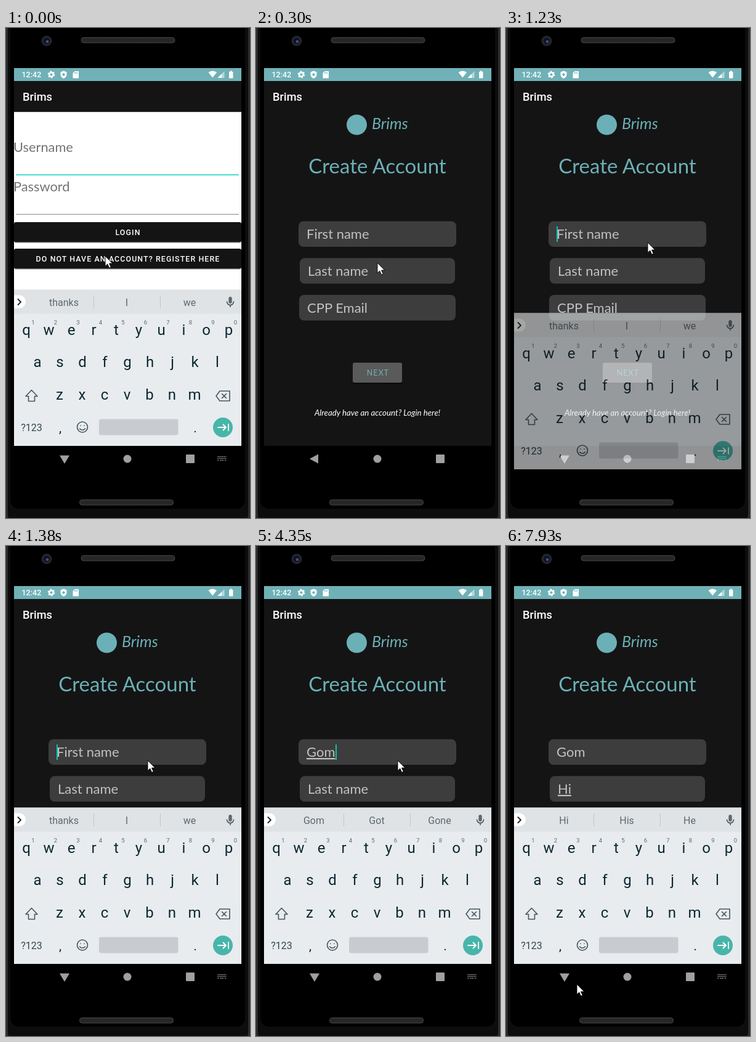
These frames come from a looping animation (396 by 795 pixels, 8000 ms). An HTML page:

```html
<!DOCTYPE html>
<html lang="en">
<head>
<meta charset="utf-8">
<title>Create account demo</title>
<style>
html, body { margin: 0; width: 100%; height: 100%; overflow: hidden; background: #000; }
svg { display: block; width: 100vw; height: 100vh; }
text { font-family: Lato, sans-serif; }
.roboto text, text.roboto { font-family: Roboto, sans-serif; }
.mid { text-anchor: middle; }
.caps { font-size: 12.4px; letter-spacing: 1.1px; text-anchor: middle; }
.line { fill: none; stroke-linecap: round; stroke-linejoin: round; }
</style>
</head>
<body>
<svg viewBox="0 0 396 795">
  <defs>
    <pattern id="mesh" width="3" height="3" patternUnits="userSpaceOnUse">
      <rect width="3" height="3" fill="#1c1c1c"/>
      <path d="M0 3L3 0" stroke="#3c3c3c"/>
    </pattern>
    <clipPath id="screen"><rect x="13" y="65" width="369" height="651"/></clipPath>
  </defs>

  <!-- phone body -->
  <rect width="396" height="795" fill="#24262b"/>
  <rect x="2" y="-40" width="392" height="860" rx="34" fill="#0d0d0d" stroke="#343434" stroke-width="1.5"/>
  <rect x="7" y="-40" width="381" height="820" rx="14" fill="#000"/>
  <circle cx="66" cy="21" r="8.5" fill="#25252a"/>
  <circle cx="66" cy="21" r="5" fill="#10131f"/>
  <circle cx="67" cy="22" r="2.3" fill="#3b4fa0"/>
  <g fill="url(#mesh)" stroke="#474747">
    <rect x="122" y="15.5" width="152" height="8.5" rx="4"/>
    <rect x="119.500" y="765.500" width="152" height="8.500" rx="4"/>
  </g>

  <g clip-path="url(#screen)">
    <rect x="13" y="86" width="369" height="592" fill="#141414"/>

    <g id="loginPage">
      <rect x="13" y="136" width="369" height="542" fill="#fff"/>
      <path d="M13 136.500H382" stroke="#ccc"/>
      <g font-size="21.8" fill="#757575">
        <text x="12" y="201">Username</text>
        <text x="12" y="265">Password</text>
      </g>
      <path d="M16 238.300H378" stroke="#10cfc3" stroke-width="1.6"/>
      <path d="M16 302.300H378" stroke="#808080"/>
      <g fill="#bbb">
        <rect x="13" y="316" width="369" height="33" rx="3"/>
        <rect x="13" y="359" width="369" height="33" rx="3"/>
      </g>
      <rect x="13" y="315" width="369" height="32.500" rx="3" fill="#141414"/>
      <rect id="register" x="13" y="358" width="369" height="32.500" rx="3"/>
      <g class="roboto" fill="#fff" font-weight="500">
        <text class="caps" x="198" y="336">LOGIN</text>
        <text class="caps" x="198" y="379">DO NOT HAVE AN ACCOUNT? REGISTER HERE</text>
      </g>
    </g>

    <g id="signupPage">
      <circle cx="163.500" cy="157" r="16.500" fill="#6cb0b7"/>
      <text x="188" y="164" font-size="25" font-style="italic" fill="#6cb0b7">Brims</text>
      <text class="mid" x="197" y="236" font-size="33" fill="#6cb0b7">Create Account</text>
      <g id="fields" font-size="22"></g>
      <rect x="157" y="544.500" width="80" height="33" rx="3" fill="#060606"/>
      <rect x="157" y="543" width="80" height="32.500" rx="3" fill="#5a5a5a"/>
      <text class="caps" x="198" y="564" fill="#6cb0b7">NEXT</text>
      <text class="mid" x="197" y="629" font-size="13.3" font-style="italic" fill="#fff">Already have an account? Login here!</text>
    </g>

    <!-- status bar and toolbar -->
    <rect x="13" y="65" width="369" height="21" fill="#6fb1b7"/>
    <g fill="#fff" class="roboto" font-weight="500">
      <text x="25.500" y="80" font-size="12.5">12:42</text>
      <text x="27" y="118" font-size="18.300">Brims</text>
    </g>
    <g fill="#fff">
      <circle cx="73.500" cy="75.500" r="3.300" fill="none" stroke="#fff" stroke-width="2.400"/>
      <circle cx="73.500" cy="75.500" r="5" fill="none" stroke="#fff" stroke-width="1.800" stroke-dasharray="2.600 2.636"/>
      <path d="M93.500 69.500l5 2v4q0 4-5 6.500q-5-2.500-5-6.500v-4z"/>
      <path d="M93.500 73l2.600 2.600-2.600 2.600-2.600-2.600z" fill="#6fb1b7"/>
      <path d="M111.500 70h6.500v11.500h-9.500v-8.500z"/>
      <path d="M111.500 71.500v2.500m2-2.500v2.500m2-2.500v2.500" stroke="#6fb1b7"/>
      <path d="M328.500 72q6.800-5 13.600 0l-6.800 8.500z"/>
      <path d="M354.500 70v11h-11z" opacity=".5"/>
      <path d="M350 74.500v6.500h-6.500z"/>
      <path d="M362 71h1.700v-1.500h3v1.500h1.700v10.500h-6.400z"/>
    </g>

    <!-- navigation bar -->
    <rect x="13" y="678" width="369" height="38" fill="#000"/>
    <g fill="#a0a0a0">
      <path id="back" d="M101 691.500v15l-14-7.500z"/>
      <path id="hide" d="M87 693.500h16l-8 13.500z"/>
      <circle cx="197" cy="699" r="6.500"/>
      <rect x="292" y="692" width="14" height="14" rx="1"/>
      <path id="switcher" d="M343.500 695.500h14m-14 3h14m-14 3h2m2 0h6m2 0h2" stroke="#a0a0a0" stroke-width="1.600" stroke-dasharray="1.600 1"/>
    </g>

    <g id="keyboard" class="roboto">
      <rect x="13" y="424.500" width="369" height="253.500" fill="#e8ecef"/>
      <rect x="13" y="424.500" width="369" height="39" fill="#dfe3e6"/>
      <path d="M142.500 434v21M250.500 434v21" stroke="#c2c7ca"/>
      <path d="M13 433.500h8.500a10.500 10.500 0 0 1 0 21h-8.500z" fill="#fff"/>
      <g id="words" class="mid" font-size="16" fill="#5d686e"></g>
      <g id="keys" class="mid" fill="#0c2730"></g>
      <rect x="151" y="634.500" width="128.500" height="26" rx="3" fill="#c8ccd0"/>
      <circle cx="352" cy="648" r="16" fill="#48b5aa"/>
      <g class="line" stroke="#fff" stroke-width="1.900">
        <path d="M344 648h13m-4.500-4.500l4.500 4.500-4.500 4.500M361 643v10"/>
      </g>
      <g class="line" stroke="#46555c" stroke-width="1.600">
        <path d="M19.500 440l4.500 4.500-4.500 4.500" stroke="#222" stroke-width="1.900"/>
        <path d="M41.500 587.500l9.500 10h-4.500v8h-10v-8h-4.500z"/>
        <path d="M347 589h16v16h-16l-6-8zM350.500 593.500l7 7m0-7l-7 7"/>
        <circle cx="124" cy="647.500" r="8.500"/>
        <path d="M119.500 650q4.500 4.500 9 0M121 645v.2M127 645v.2"/>
        <path d="M358.500 444a5.500 5.500 0 0 0 11 0M364 449.500v3"/>
      </g>
      <rect x="361.300" y="436" width="5.400" height="11" rx="2.700" fill="#5d686e"/>
    </g>
  </g>

  <path id="pointer" d="M0 0V16.500L3.800 13L6.600 19.300L9.300 18L6.500 12H11.800Z" fill="#fff" stroke="#000" stroke-width=".9"/>
</svg>

<script>
const LOOP = 8000;
const el = id => document.getElementById(id);
const label = (x, y, size, s, extra = '') =>
  `<text x="${x}" y="${y}" font-size="${size}" ${extra}>${s}</text>`;

// Keyboard rows: letters, first key centre, baseline
const PITCH = 36.5;
const rows = [['qwertyuiop', 33, 498], ['asdfghjkl', 51, 550], ['zxcvbnm', 87, 603]];
el('keys').innerHTML = rows.map(([letters, x, y], r) =>
  [...letters].map((c, i) =>
    label(x + i * PITCH, y, 24, c) +
    (r ? '' : label(x + 11 + i * PITCH, 480.5, 9.5, (i + 1) % 10, 'fill="#5d686e"'))
  ).join('')).join('') +
  label(41.5, 653.5, 16, '?123', 'fill="#34464e"') + label(88, 656, 21, ',') + label(307, 656, 21, '.');

el('words').innerHTML = [94, 196, 298].map(x => label(x, 450.5, 16, '')).join('');
const words = [...el('words').children];

// Form fields: hint, left edge, top, width
const PAD = 13;
const fields = [['First name', 69, 313.5, 256], ['Last name', 71, 373.3, 252], ['CPP Email', 70, 433, 254]];
el('fields').innerHTML = fields.map(([, x, y, w]) =>
  `<rect x="${x}" y="${y}" width="${w}" height="41.500" rx="8" fill="#3d3d3d"/>` +
  label(x + PAD, y + 28.5, 22, '', 'fill="#c2c2c2"')).join('') +
  '<rect id="caret" width="2" height="25" fill="#12c0b0"/>';
const inputs = [...el('fields').querySelectorAll('text')];

const IDLE = ['thanks', 'I', 'we'];

// Each step changes only what it names; caret is on (1) or off (0)
const steps = [
  [0, { page: 'login', pressed: false, kb: 1, caret: 0, focus: 0, values: ['', ''], typing: false, words: IDLE, at: [161, 370] }],
  [150, { pressed: true, kb: 0 }],
  [300, { page: 'signup', at: [197, 381] }],
  [420, { at: [375, 432] }],
  [540, { at: [311, 457] }],
  [690, { at: [262, 400] }],
  [810, { at: [236, 358] }],
  [930, { at: [230, 348] }],
  [1080, { caret: 1 }],
  [1230, { kb: 0.62 }],
  [1380, { kb: 1 }],
  [1630, { caret: 0 }],
  [2090, { caret: 1 }],
  [2650, { caret: 0 }],
  [3050, { caret: 1 }],
  [3550, { caret: 0 }],
  [3950, { caret: 1, typing: true, values: ['G', ''], words: ['Go', 'Good', 'Get'] }],
  [4200, { values: ['Go', ''], words: ['Go', 'Got', 'Good'] }],
  [4350, { values: ['Gom', ''], words: ['Gom', 'Got', 'Gone'] }],
  [4780, { caret: 0 }],
  [5090, { caret: 1, focus: 1, typing: false, words: IDLE }],
  [5620, { caret: 0 }],
  [6050, { caret: 1 }],
  [6610, { caret: 0 }],
  [6910, { caret: 1, typing: true, values: ['Gom', 'H'], words: ['He', 'How', 'Has'] }],
  [7030, { values: ['Gom', 'Hi'], words: ['Hi', 'His', 'He'] }],
  [7620, { caret: 0, at: [159, 481] }],
  [7770, { at: [159, 737] }],
  [7930, { at: [115, 711] }]
];
let merged = {};
const states = steps.map(([time, change]) => ({ time, ...(merged = { ...merged, ...change }) }));

const show = (id, on) => { el(id).style.display = on ? '' : 'none'; };

function draw(s) {
  show('loginPage', s.page === 'login');
  show('signupPage', s.page === 'signup');
  show('keyboard', s.kb);
  show('back', !s.kb);
  show('hide', s.kb);
  show('switcher', s.kb);
  show('caret', s.caret);
  el('register').setAttribute('fill', s.pressed ? '#404040' : '#141414');
  el('keyboard').setAttribute('opacity', s.kb);
  el('keyboard').setAttribute('transform', `translate(0 ${(1 - s.kb) * 100})`);
  el('pointer').setAttribute('transform', `translate(${s.at})`);
  words.forEach((w, i) => { w.textContent = s.words[i]; });
  inputs.forEach((input, i) => {
    input.textContent = s.values[i] || fields[i][0];
    input.style.textDecoration = s.typing && s.focus === i ? 'underline' : 'none';
  });
  if (s.caret) {
    const [, x, y] = fields[s.focus];
    const typed = s.values[s.focus] ? inputs[s.focus].getComputedTextLength() : 0;
    el('caret').setAttribute('x', Math.round(x + PAD + typed));
    el('caret').setAttribute('y', Math.round(y + 8));
  }
}

const start = performance.now();
let current;
function tick() {
  const t = (performance.now() - start) % LOOP;
  const state = states.findLast(s => s.time <= t);
  if (state !== current) draw(current = state);
  requestAnimationFrame(tick);
}
tick();
</script>
</body>
</html>
```
